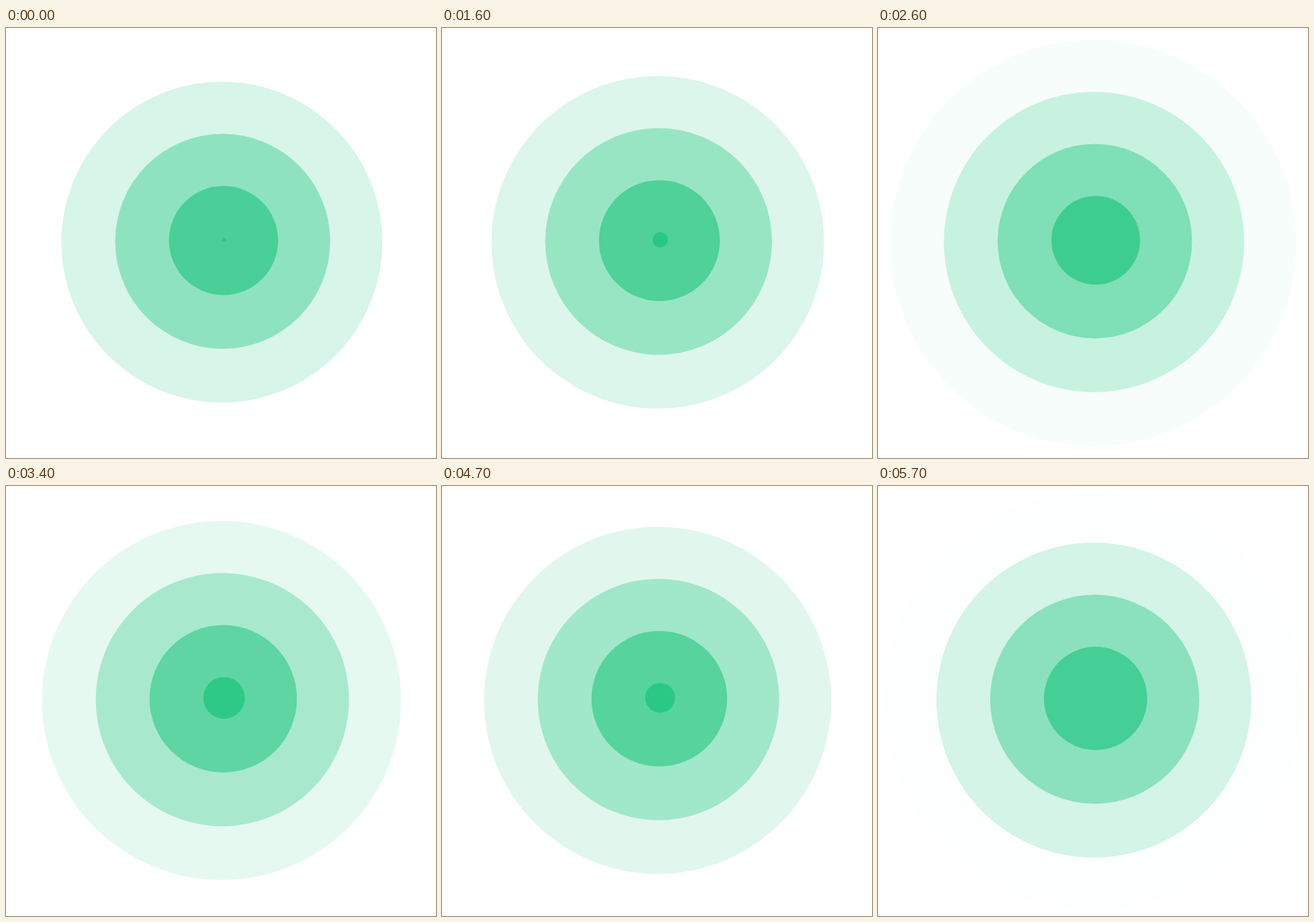
Animation, 640 px wide and 640 px high, one loop 5.8 s. Source, as an HTML page with a canvas:

```html
<!DOCTYPE html>
<html lang="en">
<head>
<meta charset="utf-8">
<title>Pulsing circles</title>
<style>
  html, body { margin: 0; width: 100%; height: 100%; overflow: hidden; background: #fff; }
  canvas { display: block; }
</style>
</head>
<body>
<canvas id="stage" width="640" height="640"></canvas>
<script>
const ctx = document.getElementById('stage').getContext('2d');
const LOOP = 5800, HOLD = 100, TICK = 40, TICKS = 36, RINGS = 4;
const start = performance.now();

// age runs from 0 (tiny, solid) to RINGS (full size, clear)
function ring(age) {
  const alpha = (RINGS - age) / (RINGS + 0.47 * age);
  ctx.fillStyle = `rgba(39, 199, 131, ${alpha})`;
  ctx.beginPath();
  ctx.arc(325 - 1.25 * age, 315 + 1.25 * age, 2.5 + 78.75 * age, 0, 2 * Math.PI);
  ctx.fill();
}

function draw(now) {
  const t = Math.max(0, now - start) % LOOP;
  const held = Math.floor(t / HOLD) * HOLD;
  const phase = Math.floor(held / TICK) % TICKS / TICKS;
  ctx.fillStyle = '#fff';
  ctx.fillRect(0, 0, 640, 640);
  for (let i = RINGS - 1; i >= 0; i--) ring(phase + i);
  requestAnimationFrame(draw);
}
draw(start);
</script>
</body>
</html>
```
